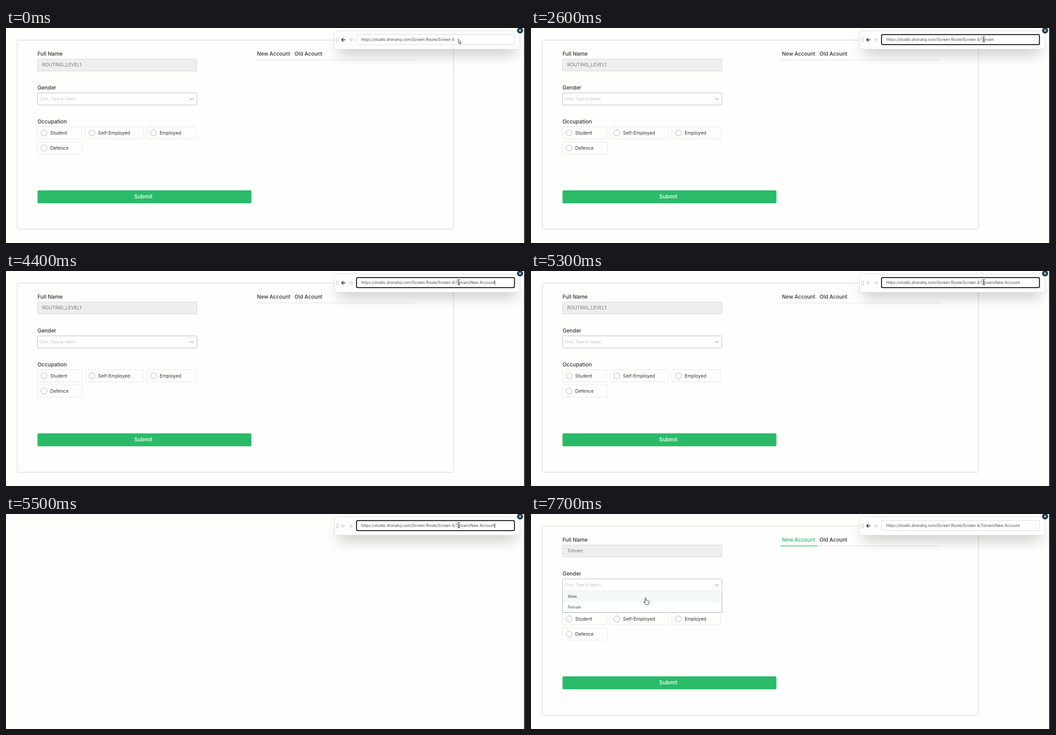
These frames come from a looping animation (1162x482 px, 8000 ms). An HTML page:

```html
<!DOCTYPE html>
<html lang="en">
<head>
<meta charset="utf-8">
<title>Route preview</title>
<style>
html, body { margin: 0; width: 100%; height: 100%; overflow: hidden; background: #fefefd; }
svg { display: block; width: 100vw; height: 100vh; }
text { font-family: Inter, "Open Sans", sans-serif; white-space: pre; }
</style>
</head>
<body>
<svg id="stage" viewBox="0 0 1162 482" fill="none"></svg>
<script>
const LOOP = 8000;
const GREEN = '#2abb69', INK = '#333';
const PERSON = 'Tolvam';
const BASE_URL = 'https://studio.dronahq.com/Screen Route/Screen 4';
const URL_X = 795.5;

const text = (x, y, s, size, fill = INK, attrs = '') =>
  `<text x="${x}" y="${y}" font-size="${size}" fill="${fill}" ${attrs}>${s}</text>`;
const label = (x, y, s, fill, attrs = '') =>
  text(x, y, s, 11.9, fill, 'font-weight="500" ' + attrs);
const rect = (x, y, w, h, fill, stroke = 'none', rx = 2, attrs = '') =>
  `<rect x="${x}" y="${y}" width="${w}" height="${h}" rx="${rx}" fill="${fill}" stroke="${stroke}" ${attrs}/>`;
const path = (d, stroke, width = 1, attrs = '') =>
  `<path d="${d}" stroke="${stroke}" stroke-width="${width}" ${attrs}/>`;
const circle = (x, y, r, fill, stroke = 'none') =>
  `<circle cx="${x}" cy="${y}" r="${r}" fill="${fill}" stroke="${stroke}"/>`;
const group = (id, body, attrs = '') => `<g id="${id}" ${attrs}>${body}</g>`;

const option = (x, y, w, s) =>
  rect(x, y, w, 27, 'none', '#e6e6e6') +
  circle(x + 14.7, y + 13.7, 6.7, '#fff', '#a9a9a9') +
  text(x + 28.5, y + 17.5, s, 10.4);

function form() {
  return rect(26, 28, 975, 422.5, '#000', 'none', 2, 'opacity=".35" filter="url(#soft)"') +
    rect(26, 28, 975, 422.5, '#fefefd') +
    label(70.5, 62, 'Full Name') +
    rect(70.5, 69.5, 357, 27, '#eee', '#d6d6d6') +
    text(81, 86.4, '', 10.4, '#777', 'id="fullName"') +
    label(70.5, 137.8, 'Gender') +
    rect(70.5, 145.5, 357, 27, '#fff', '#b5b5b5') +
    text(75, 162.4, 'Click, Type to Select', 8.4, '#bdbdbd') +
    path('M412 157l4 4 4-4', '#666') +
    label(70.5, 214.4, 'Occupation') +
    option(70.5, 221.5, 99, 'Student') +
    option(177.5, 221.5, 130, 'Self-Employed') +
    option(315.5, 221.5, 109.5, 'Employed') +
    option(70.5, 255.5, 100.5, 'Defence') +
    rect(70.5, 364, 479, 29, GREEN, 'none', 3) +
    text(307.5, 382.2, 'Submit', 12.2, '#fff', 'font-weight="500" text-anchor="middle"') +
    path('M558 71.5H914.5', '#dcdcdc') +
    group('tabLine', path('M558 71.5H641.5', GREEN, 1.5)) +
    text(562, 62, 'New Account', 11.6, INK, 'id="tab" font-weight="500"') +
    text(646, 62, 'Old Acount', 11.7, INK, 'font-weight="500"');
}

function menu() {
  return path('M70.5 172.5V220.5H427.5V172.5', '#9bb5c4', 1, 'fill="#fff"') +
    rect(71, 172.5, 356, 25, '#f3faf7', 'none', 0) +
    text(82.5, 187.5, 'Male', 8.8, '#555') +
    text(82.5, 211.8, 'Female', 8.8, '#555');
}

// Builder screen dimmed by a heavy overlay
function editor() {
  const ink = '#090909', faint = '#171717', line = '#2b2b2b', leaf = '#0b4728';
  const small = (x, y, s) => text(x, y, s, 7.6, ink);
  const head = (y, s) => small(980, y, s) + path(`M1036 ${y - 3}H1156`, line);
  const toggle = y => rect(978, y - 4.5, 17, 9, '#191919', 'none', 4.5) + circle(982, y, 4.5, '#2b2b2b');
  const radio = (x, y, s) => circle(x, y, 6.7, 'none', faint) + text(x + 14, y + 4, s, 10.4, ink);
  const stepper = x =>
    rect(x - 8, 159.5, 17, 20, 'none', faint) +
    path(`M${x - 4} 167l4-4 4 4M${x - 4} 172l4 4 4-4`, ink);
  const align = (x, color) =>
    path(`M${x - 4} 209h8M${x - 4} 211.5h5M${x - 4} 214h8`, color, 1.2);

  return rect(0, 0, 1160, 482, '#222', 'none', 0) +
    rect(57, 28, 742, 418, '#232323', line) +
    label(92.5, 62.5, 'Full Name', ink) +
    rect(92, 71, 270, 27.5, '#1f1f1f') +
    text(103, 88.6, 'ROUTING_LEVEL1', 10.4, ink) +
    rect(88, 110, 60.5, 15.5, '#05401f', 'none', 1) +
    path('M109 122v-8m-3 3l3-3 3 3M95 114v8M98.5 114v8', '#111', 1, 'stroke-dasharray="8 0"') +
    text(116, 121, 'gender', 9, '#111') +
    rect(88.5, 126, 277.5, 56, 'none', leaf, 0) +
    [[88.5, 126], [366, 126], [88.5, 182], [366, 182]].map(([x, y]) => circle(x, y, 2.7, '#222', leaf)).join('') +
    label(92.5, 139, 'Gender', ink) +
    path('M333 132q5-3 10 0v7q-5 3-10 0zM333 132q5 3 10 0M333 135.5q5 3 10 0M359 132a5 5 0 1 0 1 5M360 129v4h-4', leaf, 1.3) +
    rect(92.5, 148.5, 269, 26, 'none', faint) +
    text(97, 165, 'Click, Type to Select', 8.4, faint) +
    path('M346 158.500l4.500 4.500 4.500-4.500', ink) +
    label(92.5, 215, 'Occupation', ink) +
    radio(107, 237.5, 'Student') + radio(213, 237.5, 'Self-Employed') +
    radio(107, 271.5, 'Employed') + radio(223.5, 271.5, 'Defence') +
    path('M190.500 226V249', line) +
    text(432, 215, 'Annual Income', 11.2, '#2d2d2d') +
    [[470, 241, '0 - 5L'], [553, 241, '10L - 15L'], [658, 241, '15L - 20L'], [461, 275, '5L']]
      .map(([x, y, s]) => text(x, y, s, 8, '#1c1c1c')).join('') +
    text(568.5, 267.2, 'HIDDEN', 10.9, '#471719') +
    label(468, 63, 'New Account', ink) + label(552, 63, 'Old Acount', ink) +
    rect(92, 365, 362.5, 29, '#04220f', 'none', 3) +
    text(271, 383.4, 'Submit', 12.2, '#454545', 'font-weight="500" text-anchor="middle"') +
    rect(922, 0, 8, 482, '#1d1d1d', 'none', 0) +
    rect(930, 0, 230, 482, '#212121', 'none', 0) +
    text(970, 3, 'INFO', 9, ink, 'font-weight="600"') +
    path('M947 69l-7 11h6l-2 8 9-12h-6l3-7z', ink, 1.3) +
    small(969, 65, 'Unique Name') +
    rect(1034, 53, 122, 19, '#1d1d1d') + text(1040, 66, 'gender', 9, ink) +
    head(94, 'Label') +
    small(974, 108, 'Hidden') + small(1038, 108, 'Text') + toggle(126) +
    rect(1036, 116, 120, 20, 'none', faint) + text(1042, 130, 'Gender', 9.2, ink) +
    small(975, 152, 'Size') + small(1038, 152, 'Weight') + small(1100, 152, 'Color') +
    stepper(983) + stepper(1046) +
    text(999.5, 172.5, '16', 10.2, ink) + small(1018, 171.5, 'px') +
    text(1065, 172.5, '500', 10.2, ink) +
    rect(1104, 162, 15, 14, ink, '#111', 1) + text(1124, 172.5, 'var(--t', 10.2, ink) +
    small(974, 195, 'Alignment') +
    rect(974, 202, 182, 20, 'none', faint) + rect(974, 202, 48, 20, '#1b2520', 'none') +
    align(997, leaf) + align(1043, ink) + align(1089, ink) + align(1135, ink) +
    head(253, 'Tooltip') + small(974, 268, 'Visibility') + toggle(285.5) +
    head(326, 'Description') + small(974, 341, 'Visibility') + toggle(358.5) +
    head(400, 'External Css') + small(974, 415, 'Apply  ⓘ') + toggle(432.5) +
    head(473, 'Generic');
}

function bar() {
  const dots = [740.5, 744.2].map(x => [22.5, 25.3, 28.1, 30.9].map(y => circle(x, y, .8, '#999')).join('')).join('');
  return rect(744, 33, 397, 23, '#000', 'none', 2, 'opacity=".27" filter="url(#deep)"') +
    rect(735.5, 6.5, 415, 41, '#fefefe', '#dedede', 3) + dots +
    path('M760 26.500H751.500M755.500 22.500l-4 4 4 4', '#222', 1.6, 'id="back"') +
    path('M767.500 26.500H776M772 22.500l4 4-4 4', '#cfcfcf', 1.4) +
    rect(784.5, 14.5, 354, 23, '#fff', '#d3d7da', 3, 'id="field"') +
    text(URL_X, 29, '', 8.65, '#4a4a4a', 'id="url"') +
    path('M0 21V31', '#222', 1, 'id="urlCaret"') +
    circle(1151, 5.5, 6.8, '#20374b') +
    path('M1148.700 3.200l4.600 4.600M1153.300 3.200l-4.600 4.600', '#fff', 1.2);
}

const stage = document.getElementById('stage');
stage.innerHTML = `<defs>
  <filter id="soft" x="-2%" y="-4%" width="104%" height="108%"><feGaussianBlur stdDeviation="1.6"/></filter>
  <filter id="deep" x="-20%" y="-300%" width="140%" height="700%"><feGaussianBlur stdDeviation="16"/></filter>
</defs>` +
  rect(0, 0, 1162, 482, '#fefefd', 'none', 0) +
  group('form', form()) + group('menu', menu()) +
  path('M75 155.500V165', '#333', 1, 'id="selectCaret"') +
  group('editor', editor()) + group('bar', bar()) +
  rect(1160, 0, 2, 482, '#24272b', 'none', 0) +
  group('arrow', path('M0 0V9.500L2.300 7.600 3.900 11.200 5.600 10.400 4 6.900H7z', '#222', .9, 'fill="#fff"')) +
  group('beam', path('M-3-6Q0-6 0-4.500Q0-6 3-6M0-4.500V4.500M-3 6Q0 6 0 4.500Q0 6 3 6', '#222', 1.1)) +
  group('hand', path('M-1.500 4V-6Q-1.500-7.200-.3-7.200Q.9-7.200.9-6V-1.600Q3-2.400 3.400-.9Q5.400-1.500 5.600.1Q7.300-.2 7.300 1.400V4Q7.200 6 5.700 8H-.5Q-2-.1+5-4.600 3.200Q-5.200 1.800-4 1.300Q-2.800 1-1.500 2.800'
    .replace('Q-2-.1+5-4.600 3.200', 'Q-2 5-4.600 3.200'), '#222', 1, 'fill="#fff" stroke-linejoin="round"'));

const el = {};
stage.querySelectorAll('[id]').forEach(n => el[n.id] = n);

const show = (name, on) => el[name].setAttribute('display', on ? 'inline' : 'none');
const place = (name, x, y) => el[name].setAttribute('transform', `translate(${x} ${y})`);
const set = (name, attrs) => { for (const k in attrs) el[name].setAttribute(k, attrs[k]); };

// A caret flips at each listed time
const lit = (flips, t) => flips.filter(f => f <= t).length % 2 === 1;
const URL_FLIPS = [500, 700, 1000, 1500, 1800, 2600, 2700, 3000, 3200, 3600,
  3800, 4200, 4400, 4700, 4900, 5300, 5500, 5700, 6100, 6400];
const SELECT_FLIPS = [6600, 7100, 7400, 7700];

const keys = [[1200, '/'], ...[...PERSON].map((c, i) => [1800 + i * 100, c]),
  [2700, '/'], [3900, 'New Account']];
const pointer = [[6600, 260, 168], [6700, 259, 178], [6800, 258, 188], [6900, 258, 195]];

function render(t) {
  const loaded = t >= 6400;
  const focused = t >= 400 && !loaded;

  show('form', t < 5400 || loaded);
  show('editor', t >= 5400 && t < 5500);
  show('menu', t >= 6700);
  show('tabLine', loaded);
  set('tab', { fill: loaded ? GREEN : INK });
  el.fullName.textContent = loaded ? PERSON : 'ROUTING_LEVEL1';

  set('back', { stroke: t >= 5000 && !loaded ? '#cfcfcf' : '#222' });
  set('field', focused
    ? { x: 784.8, y: 14.8, width: 353.6, height: 22.4, stroke: '#0d0d0d', 'stroke-width': 2 }
    : { x: 784.5, y: 14.5, width: 354, height: 23, stroke: '#d3d7da', 'stroke-width': 1 });
  el.url.textContent = BASE_URL + keys.filter(k => k[0] <= t).map(k => k[1]).join('');
  show('urlCaret', lit(URL_FLIPS, t));
  place('urlCaret', Math.round(URL_X + el.url.getComputedTextLength()) + .5, 0);
  show('selectCaret', lit(SELECT_FLIPS, t));

  const hand = pointer.filter(p => p[0] <= t).pop();
  show('arrow', t < 400);
  show('beam', t >= 400 && !hand);
  show('hand', !!hand);
  place('arrow', 1012.7, 25);
  if (loaded) place('beam', 260, 159);
  else place('beam', 1013.7, 25);
  if (hand) place('hand', hand[1] - 1, hand[2]);
}

const start = performance.now();
function tick() {
  render((performance.now() - start) % LOOP);
  requestAnimationFrame(tick);
}
tick();
</script>
</body>
</html>
```
